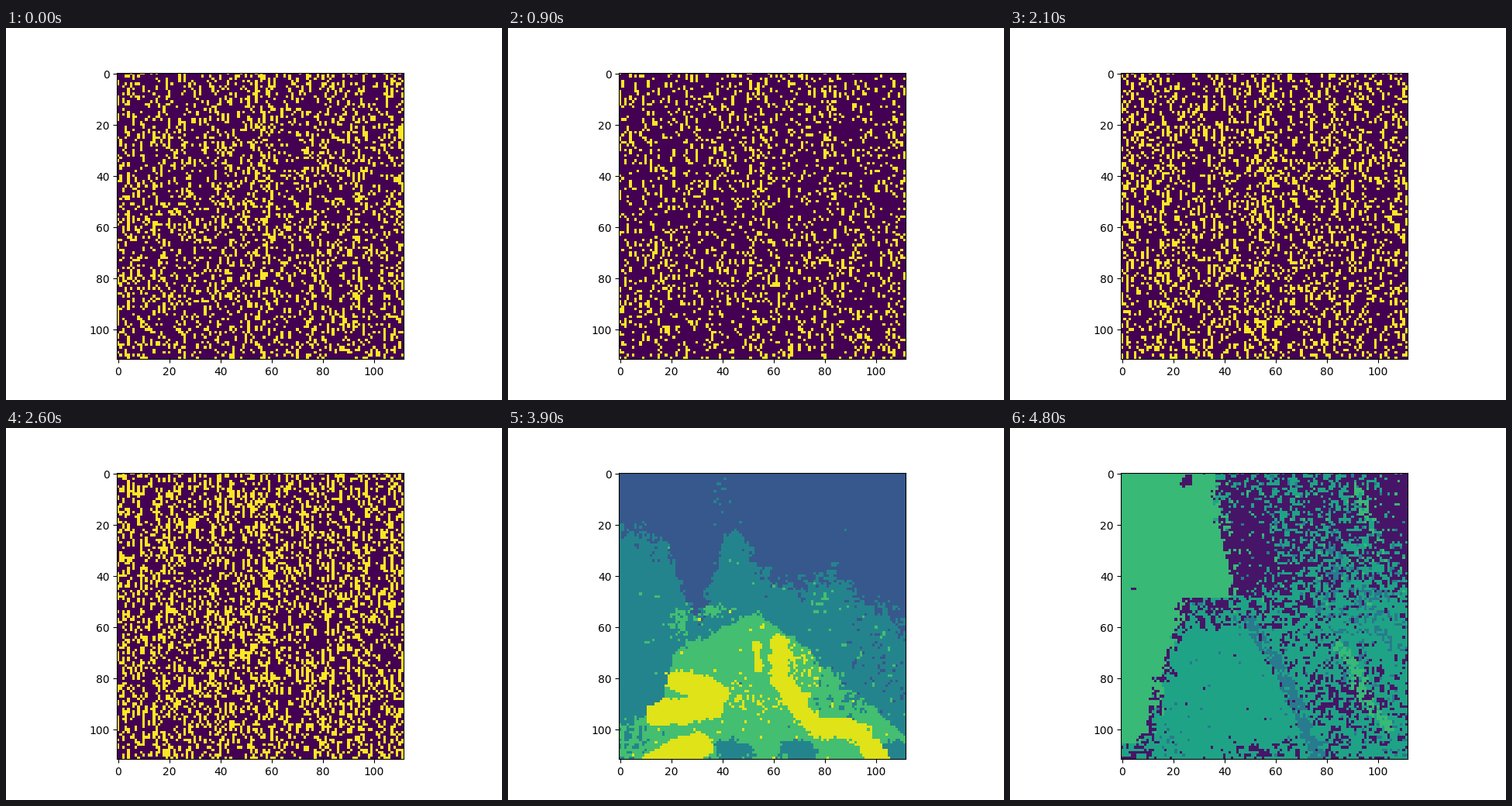
A matplotlib script that plays this animation: 640x480 px, repeating every 4.9 s.

```python
import numpy as np
import matplotlib.pyplot as plt
from matplotlib.animation import FuncAnimation

N = 112
FRAMES = 49
Y, X = np.mgrid[0:N, 0:N].astype(float)
rnd = np.random.default_rng(12)


def smooth(a):
    for axis in (0, 1):
        a = (np.roll(a, 1, axis) + a + np.roll(a, -1, axis)) / 3
    return a


def clumps():
    """Slightly clustered noise, spread evenly over 0..1."""
    w = rnd.normal(size=(N, N))
    w += 0.5 * np.roll(w, 1, 0) + 0.4 * np.roll(w, 1, 1)
    return w.argsort(axis=None).argsort().reshape(N, N) / N**2


columns = rnd.normal(0, 0.18, N) + 0.3 * np.exp(-np.arange(N) / 15) * (-1.0) ** np.arange(N)
grain = [clumps() for _ in range(4)]
wobble = 0.6 * rnd.normal(size=(N, N)) + 3 * smooth(rnd.normal(size=(N, N)))


def bump(v, centre, width):
    return np.exp(-((v - centre) / width) ** 2)


def blob(cx, cy, rx, ry):
    return bump(X, cx, rx) * bump(Y, cy, ry)


def trail(width, *points, rough=0.5):
    """Cells within a ragged distance of a line through the points."""
    best = np.full((N, N), np.inf)
    for (x0, y0), (x1, y1) in zip(points, points[1:]):
        dx, dy = x1 - x0, y1 - y0
        s = np.clip(((X - x0) * dx + (Y - y0) * dy) / (dx**2 + dy**2), 0, 1)
        best = np.minimum(best, np.hypot(X - x0 - s * dx, Y - y0 - s * dy))
    return best + rough * wobble < width


def shimmer(rng, amount=0.1):
    """Fixed grain in which a small share of cells is redrawn."""
    return [np.where(rng.random((N, N)) < amount, rng.random((N, N)), g) for g in grain]


def static(f, rng):
    w = rng.normal(size=(N, N))
    field = w + 0.4 * np.roll(w, 1, 0) - 0.3 * np.roll(w, 1, 1) + columns
    density = np.interp(f, [0, 9, 16, 26], [0.24, 0.18, 0.18, 0.32])
    return (field > np.quantile(field, 1 - density)).astype(float)


def hill(f, rng):
    a, b, c, d = shimmer(rng)
    blue, teal, green, yellow = range(4)

    ridge = 22 + 0.32 * X + 24 * bump(X, 30, 8) - 15 * bump(X, 44, 8) - 8 * bump(X, 84, 10)
    lab = np.where(Y > ridge + 2.5 * wobble, teal, blue)
    lab[a < 0.3 * blob(39, 10, 3, 8)] = teal
    lab[(lab == teal) & (b < 0.15 * blob(102, 72, 10, 18))] = blue
    lab[(lab == teal) & (c < 0.01 + 0.15 * blob(86, 50, 8, 12))] = green
    lab[a < 0.8 * blob(24, 58, 4, 4) + 0.7 * blob(38, 54, 6, 2)] = green

    top = np.where(X > 55, 54 + 0.85 * (X - 55), 54 + 0.4 * (55 - X))
    top += 22 / (1 + np.exp((X - 19) / 1.5))
    slope = Y > top + wobble
    lab[slope] = green
    lab[slope & (b < 0.5 * blob(3, 102, 7, 10) + 0.4 * blob(92, 88, 12, 5))] = teal
    for cx in (44, 70, 110):
        lab[blob(cx, 109, 8, 5) + 0.1 * wobble > 0.4] = teal

    lab[trail(5, (23, 81), (37, 86))
        | trail(5, (15, 94), (36, 91))
        | trail(5, (14, 112), (31, 106))
        | trail(1.5, (53, 67), (55, 76))
        | trail(3.8, (62, 67), (62, 78), (71, 93), (78, 100), (92, 100), (102, 112))] = yellow
    spots = 0.35 * blob(53, 89, 10, 3) + 0.3 * blob(71, 78, 6, 12) + 0.25 * blob(46, 84, 5, 6)
    lab[(lab == green) & (d < 0.012 + spots)] = yellow
    return np.array([0.275, 0.45, 0.7, 0.95])[lab]


def cliff(f, rng):
    t = np.interp(f, [44, 48], [0, 1])
    a, b, c, d = shimmer(rng)
    teal, green, sky, blue = range(4)

    # mottled ground on the right
    p = 0.62 - 0.37 * np.clip((Y - 40) / 20, 0, 1) - 0.25 * blob(96, 52, 16, 22)
    p += 0.4 * blob(110, 8, 16, 26) + 0.35 * blob(46, 28, 10, 20)
    p += t * (0.5 * blob(92, 87, 13, 7) + 0.2 * blob(54, 35, 12, 18))
    lab = np.where(a < p, teal, green)
    lab[b < 0.06 * (1 - 0.6 * t) * (Y < 56) + 0.5 * (1 - t) * blob(106, 10, 7, 9)] = sky
    lab[c < 0.02 + 0.3 * blob(83, 40, 5, 18) + 0.3 * blob(96, 56, 12, 16)
        + 0.25 * blob(104, 105, 6, 9)] = blue
    lab[trail(1.5, (88, 54), (98, 62), (112, 69)) & (d > 0.8 * t)] = blue
    strips = (trail(2.5, (87 + 6 * t, 2 + 6 * t), (92 + 6 * t, 23 - 3 * t))
              | trail(2.2, (83 + 2 * t, 68), (94, 75 + 4 * t))
              | trail(2.2, (90, 84 - 3 * t), (110 - 6 * t, 102 - 3 * t)))
    lab[strips & (d > 0.1 + 0.3 * t)] = sky

    # sky on the left, smooth slope below it
    shore = np.where(Y < 49, 36 + 0.17 * Y, 23 - 0.27 * (Y - 52)) + 1.8 * wobble
    slope = (Y > 64 - 0.1 * X + wobble) & (X < 48 + 0.53 * (Y - 58))
    lab[slope] = green
    lab[slope & (b < 0.008 + 0.7 * blob(5, 110, 8, 4) + 0.35 * blob(58, 108, 20, 4))] = teal
    lab[slope & (c < 0.01 + 0.15 * blob(20, 105, 5, 8))] = blue
    lab[(X < shore + 2) & (Y > 48) & (Y < 106)] = teal
    lab[(X < shore) & (Y < 106)] = sky
    lab[trail(1.4, (24, 3), (26, 2)) | trail(0.7, (4, 45), (5, 45), rough=0)] = teal

    lab[trail(2.4, (49 + t, 58), (63 + t, 80), (77, 112), rough=0.4) & (d > 0.2 * t)] = blue
    start = np.array([0.54, 0.75, 0.97, 0.385])
    end = np.array([0.055, 0.58, 0.675, 0.41])
    return (start + (end - start) * t)[lab]


def picture(f):
    rng = np.random.default_rng(100 + f)
    scene = static if f < 30 else hill if f < 40 else cliff
    return scene(f, rng)


fig, ax = plt.subplots(figsize=(6.4, 4.8), dpi=100)
# a hair above the default keeps the tick labels off a rounding edge
fig.subplots_adjust(bottom=0.11001, top=0.88001)
image = ax.imshow(picture(0), cmap="viridis", vmin=0, vmax=1)


def update(f):
    image.set_data(picture(f))
    return [image]


anim = FuncAnimation(fig, update, frames=FRAMES, interval=100, repeat=True, repeat_delay=0)
plt.show()
```
